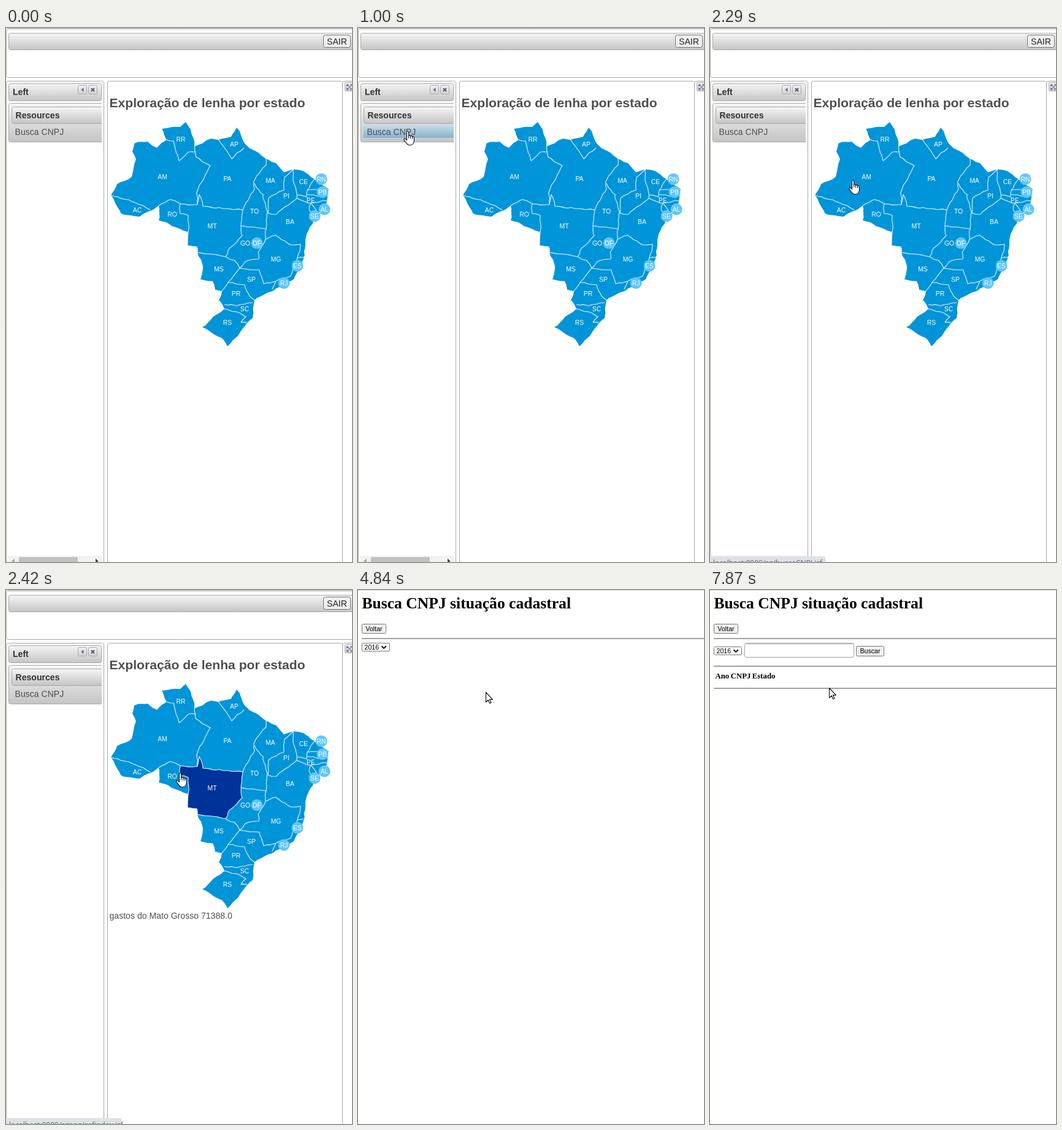
These frames come from a looping animation (564x869 px, 8 s). An HTML page with a canvas:

```html
<!DOCTYPE html>
<html lang="pt">
<head>
<meta charset="utf-8">
<title>Mapa</title>
<style>
html, body { margin: 0; width: 100%; height: 100%; overflow: hidden; background: #fff; }
canvas { display: block; }
</style>
</head>
<body>
<canvas id="stage" width="564" height="869"></canvas>
<script>
const ctx = document.getElementById('stage').getContext('2d');
const LOOP = 8000;
const SANS = '"Liberation Sans", Arial, sans-serif';
const SERIF = '"Liberation Serif", "Times New Roman", serif';
const UI = '"Open Sans", "Noto Sans", sans-serif';
const EDGE = '#a8a8a8';

// Repeatable noise by place, so neighbouring shapes share the same rough edge
function noise(x, y) {
  const n = Math.sin(x * 12.9898 + y * 78.233) * 43758.5453;
  return (n - Math.floor(n)) * 2 - 1;
}

function roughen(path, ax, ay, bx, by) {
  const len = Math.hypot(bx - ax, by - ay);
  if (len < 9) return path.lineTo(bx, by);
  const mx = (ax + bx) / 2, my = (ay + by) / 2, amp = Math.min(len * .09, 1.4);
  const x = mx + noise(mx, my) * amp, y = my + noise(my, mx) * amp;
  roughen(path, ax, ay, x, y);
  roughen(path, x, y, bx, by);
}

function rough(points, closed, path = new Path2D()) {
  const p = points.split(' ').map(Number);
  path.moveTo(p[0], p[1]);
  const end = closed ? p.length : p.length - 2;
  for (let i = 0; i < end; i += 2) {
    const j = (i + 2) % p.length;
    roughen(path, p[i], p[i + 1], p[j], p[j + 1]);
  }
  if (closed) path.closePath();
  return path;
}

const land = rough('171 272 181 254 205 242 212 214 206 201 209 188 231 185 246 195 262 182 254 164 284 161 293 153 ' +
  '301 165 307 193 334 180 346 182 367 177 376 162 389 188 424 213 440 220 453 235 468 230 485 233 503 246 526 262 ' +
  '523 283 503 310 490 336 486 373 477 393 469 409 440 424 405 443 402 472 361 518 355 508 320 487 356 457 347 443 ' +
  '352 428 341 426 337 412 317 409 321 388 312 365 311 356 296 354 297 332 270 322 249 313 249 289 218 307 ' +
  '204 305 187 301 178 285', true);
const matoGrosso = rough('284 286 312 287 315 271 321 290 386 296 383 329 385 338 362 362 358 372 ' +
  '335 368 312 365 311 356 296 354 297 332 297 305 284 302', true);
const borders = new Path2D();
[
  '171 272 210 284 235 296',
  '249 289 268 279 284 286',
  '312 287 311 268 333 224 309 209 307 193',
  '262 182 273 184 282 216 297 202 308 202',
  '346 181 368 213 388 195',
  '386 296 405 262 404 250 424 223 424 213',
  '405 253 419 271 426 299 424 327 423 344',
  '383 322 404 324 424 327',
  '468 230 454 243 453 264 428 277 427 301 441 303 455 291 474 277 468 243 468 230',
  '474 272 490 275 491 264 503 246',
  '491 264 507 263 526 262',
  '491 271 509 274 527 270',
  '474 277 497 285 523 281',
  '503 310 494 295 497 285 511 302',
  '423 344 439 337 464 353 480 352 475 374 486 373',
  '423 344 411 365 412 376 390 380 381 391',
  '358 372 372 378 381 391 413 394 420 416 440 412 464 404 475 374',
  '440 412 434 425',
  '381 391 362 414 352 428',
  '362 414 389 418 397 436 405 443',
  '356 450 376 452 402 447',
  '355 457 383 465 391 470 383 479 393 479'
].forEach(p => rough(p, false, borders));

const labels = 'RR285,181 AP372,189 AM255,242 PA361,245 MA431,248 CE485,250 PI457,273 PE497,280 AC214,296 RO271,303 ' +
  'TO405,298 MT336,322 BA463,315 GO390,350 MG440,376 MS347,392 SP400,409 PR375,432 SC389,457 RS361,479';
const dots = 'RN514,246 PB516,267 AL519,295 SE503,306 DF409,350 ES475,387 RJ453,415';
const places = s => s.split(' ').map(p => [p.slice(0, 2), ...p.slice(2).split(',').map(Number)]);

// Pointer moves: first step, last step, target
const home = { x: 638, y: 125 };
const moves = [
  [390, 600, 162, 818], [860, 1000, 81, 167], [1130, 1200, 80, 165],
  [2220, 2420, 284, 297], [4630, 4840, 208, 166], [7120, 7470, 194, 159]
];
const shapes = {
  hand: new Path2D('M-1.5 2Q0 -.6 1.6 2V8Q3.4 6.8 4.6 8.8Q6.4 7.6 7.6 9.6Q10.4 9 10.4 12V17Q10 20 8.2 22Q7 23.5 4 23.5H2Q-.6 23.3 -2 20.6L-6 15.4Q-6.6 12.6 -4.4 12.8L-1.5 15.4Z'),
  arrow: new Path2D('M.5 .5V16.5L4.2 13 6.7 18.6 9 17.6 6.5 12.1H11.4Z'),
  resize: new Path2D('M-10.5 0L-5.5 -4.5V-1.5H5.5V-4.5L10.5 0 5.5 4.5V1.5H-5.5V4.5Z')
};
const knuckles = new Path2D('M1.6 8V12.5M4.6 8.8V13M7.6 9.6V13.5');

function pointerAt(t) {
  let { x, y } = home;
  for (const [from, to, tx, ty] of moves) {
    if (t < from) break;
    const steps = Math.round((to - from) / 70) + 1;
    const passed = Math.floor((t - from) / (to - from) * (steps - 1) + 1.001);
    const rest = 1 - Math.min(passed / steps, 1);
    x = tx + (x - tx) * rest ** 2;
    y = ty + (y - ty) * rest ** 1.4;
  }
  return { x, y };
}

const overItem = ({ x, y }) => x > 8 && x < 156 && y > 157 && y < 180;

function pointerKind(t, { x, y }) {
  if (t >= 3760) return t < 4630 ? 'hand' : 'arrow';
  if (overItem({ x, y }) || ctx.isPointInPath(land, x, y)) return 'hand';
  return x >= 160 && x <= 165 ? 'resize' : 'arrow';
}

function text(s, x, y, font, color, align = 'left') {
  ctx.font = font;
  ctx.fillStyle = color;
  ctx.textAlign = align;
  ctx.fillText(s, x, y);
}

function rect(x, y, w, h, color) {
  ctx.fillStyle = color;
  ctx.fillRect(x, y, w, h);
}

function disc(x, y, r, color) {
  ctx.fillStyle = color;
  ctx.beginPath();
  ctx.arc(x, y, r, 0, 7);
  ctx.fill();
}

function box(x, y, w, h, r, fill, stroke) {
  ctx.beginPath();
  ctx.roundRect(x + .5, y + .5, w - 1, h - 1, r);
  if (fill) { ctx.fillStyle = fill; ctx.fill(); }
  if (stroke) { ctx.strokeStyle = stroke; ctx.lineWidth = 1; ctx.stroke(); }
}

function fade(y, h, from, to) {
  const g = ctx.createLinearGradient(0, y, 0, y + h);
  g.addColorStop(0, from);
  g.addColorStop(1, to);
  return g;
}

function triangle(x, y, dx, dy, color) {
  ctx.fillStyle = color;
  ctx.fill(new Path2D(`M${x} ${y}l${dx} ${dy}v${-2 * dy}Z`));
}

function line(path, color, width) {
  ctx.strokeStyle = color;
  ctx.lineWidth = width;
  ctx.stroke(new Path2D(path));
}

const bar = (x, y, w, h) => box(x, y, w, h, 3, fade(y, h, '#f6f6f6', '#c4c4c4'), EDGE);
const tool = (x, y) => box(x, y, 15, 15, 2, fade(y, 15, '#f4f4f4', '#cfcfcf'), EDGE);

function drawMap(picked) {
  ctx.lineJoin = 'round';
  ctx.fillStyle = '#0094d9';
  ctx.fill(land);
  if (picked) {
    ctx.fillStyle = '#003399';
    ctx.fill(matoGrosso);
  }
  ctx.strokeStyle = '#e6f6ff';
  ctx.lineWidth = 1.1;
  ctx.stroke(borders);
  ctx.stroke(matoGrosso);
  const label = (s, x, y) => text(s, x, y + 4, '10.4px ' + SANS, '#fff', 'center');
  for (const place of places(labels)) label(...place);
  for (const [s, x, y] of places(dots)) {
    disc(x, y, 9.5, '#5fc6fb');
    label(s, x, y);
  }
}

function drawSidebar(hover) {
  box(0, 86, 160, 800, 3, null, EDGE);
  bar(4, 90, 152, 29);
  text('Left', 11, 109, 'bold 14.08px ' + SANS, '#333');
  tool(117, 93);
  tool(134, 93);
  triangle(122.5, 100.5, 4, 3.5, '#5f6b85');
  line('M139 98l5 5m0 -5l-5 5', '#4f5a70', 2);

  ctx.save();
  ctx.beginPath();
  ctx.rect(0, 120, 156, 70);
  ctx.clip();
  bar(4, 122, 170, 64);
  bar(9, 128, 165, 28);
  if (hover) {
    rect(9, 158, 165, 22, fade(158, 22, '#c6dce8', '#83afca'));
    rect(9, 179, 165, 1, '#c3d9e5');
  }
  ctx.restore();
  text('Resources', 15.5, 147, 'bold 14.08px ' + SANS, '#333');
  text('Busca CNPJ', 14.5, 174, '14.08px ' + SANS, '#4f4f4f');

  rect(4, 859, 152, 10, '#f1f1f1');
  rect(21, 861, 96, 8, '#c1c1c1');
  triangle(9.5, 867.5, 4.5, 4, '#a3a3a3');
  triangle(150.5, 867.5, -4.5, 4, '#404040');
}

function drawHome(t, pointer) {
  box(0, 1, 580, 80, 3, null, EDGE);
  bar(4, 8, 576, 28);
  box(517, 11, 45, 21, 3, '#efefef', '#767676');
  text('SAIR', 539.5, 27, '14.08px ' + SANS, '#222', 'center');

  drawSidebar(overItem(pointer));

  box(165, 86, 384, 800, 3, null, EDGE);
  box(548, 86, 40, 800, 3, null, EDGE);
  tool(552, 88);
  line('M556 92l8 8m0 -8l-8 8M555.5 95v-3h3M555.5 97v3h3M561 92h3M561 100h3', '#66708a', 1.2);

  text('Exploração de lenha por estado', 168.5, 129, 'bold 21.12px ' + SANS, '#4f4f4f');
  const picked = t >= 2420;
  drawMap(picked);
  if (picked) text('gastos do Mato Grosso 71388.0', 168.5, 535, '14.08px ' + SANS, '#4f4f4f');
}

const rule = y => rect(6, y, 558, 2, '#a2a2a2');

function button(s, x, y, w, h) {
  box(x, y, w, h, 2, '#efefef', '#767676');
  text(s, x + w / 2, y + 12, '10.67px ' + SANS, '#000', 'center');
}

function drawSearch(loaded) {
  text('Busca CNPJ situação cadastral', 6.5, 30, 'bold 25.6px ' + SERIF, '#000');
  button('Voltar', 6, 55, 40, 16);
  rule(78);
  const y = loaded ? 92 : 86;
  box(6, y, 46, 14, 1, '#fff', '#767676');
  text('2016', 10.5, y + 11, '10.67px ' + SANS, '#000');
  line(`M38.5 ${y + 5.2}l3.7 3.7 3.7 -3.7`, '#111', 2);
  if (!loaded) return;
  box(56, 86, 179, 24, 3, '#fff', '#a0a0a0');
  rect(58, 87, 175, 2, fade(86, 4, '#a8a8a8', '#fff'));
  button('Buscar', 238, 91, 46, 17);
  rule(123);
  let x = 8.5;
  for (const head of ['Ano', 'CNPJ', 'Estado']) {
    text(head, x, 144, 'bold 12.8px ' + SERIF, '#000');
    x += ctx.measureText(head).width + 2.4;
  }
  rule(159);
}

function drawStatus(t) {
  if (t < 1200 || t >= 4100) return;
  ctx.globalAlpha = t < 1270 ? .5 : t < 3960 ? 1 : t < 4030 ? .65 : .3;
  box(-6, 859, t < 2220 ? 178 : 195, 20, 4, '#dee1e6');
  const path = t < 2420 ? 'sg/buscaCNPJ.jsf' : 'sgpag/sefindex.jsf';
  text('localhost:8080/' + path, 5, 875, '12px ' + UI, '#5f6368');
  ctx.globalAlpha = 1;
}

function drawPointer(t, pointer) {
  const { x, y } = pointer;
  const kind = pointerKind(t, pointer);
  if (t >= 1540 && t < 1740) disc(x, y, 12, 'rgba(255,255,0,.47)');
  ctx.save();
  ctx.translate(Math.round(x), Math.round(y));
  ctx.fillStyle = '#fff';
  ctx.strokeStyle = '#0a0a14';
  ctx.lineWidth = 1.1;
  ctx.fill(shapes[kind]);
  ctx.stroke(shapes[kind]);
  if (kind === 'hand') ctx.stroke(knuckles);
  ctx.restore();
}

function draw(t) {
  const pointer = pointerAt(t);
  rect(0, 0, 564, 869, '#fff');
  rect(0, 0, 564, 1, '#d9d9d9');
  if (t < 3760) drawHome(t, pointer);
  else drawSearch(t >= 7870);
  drawStatus(t);
  drawPointer(t, pointer);
}

const start = performance.now();
function tick() {
  draw((performance.now() - start) % LOOP);
  requestAnimationFrame(tick);
}
tick();
</script>
</body>
</html>
```
